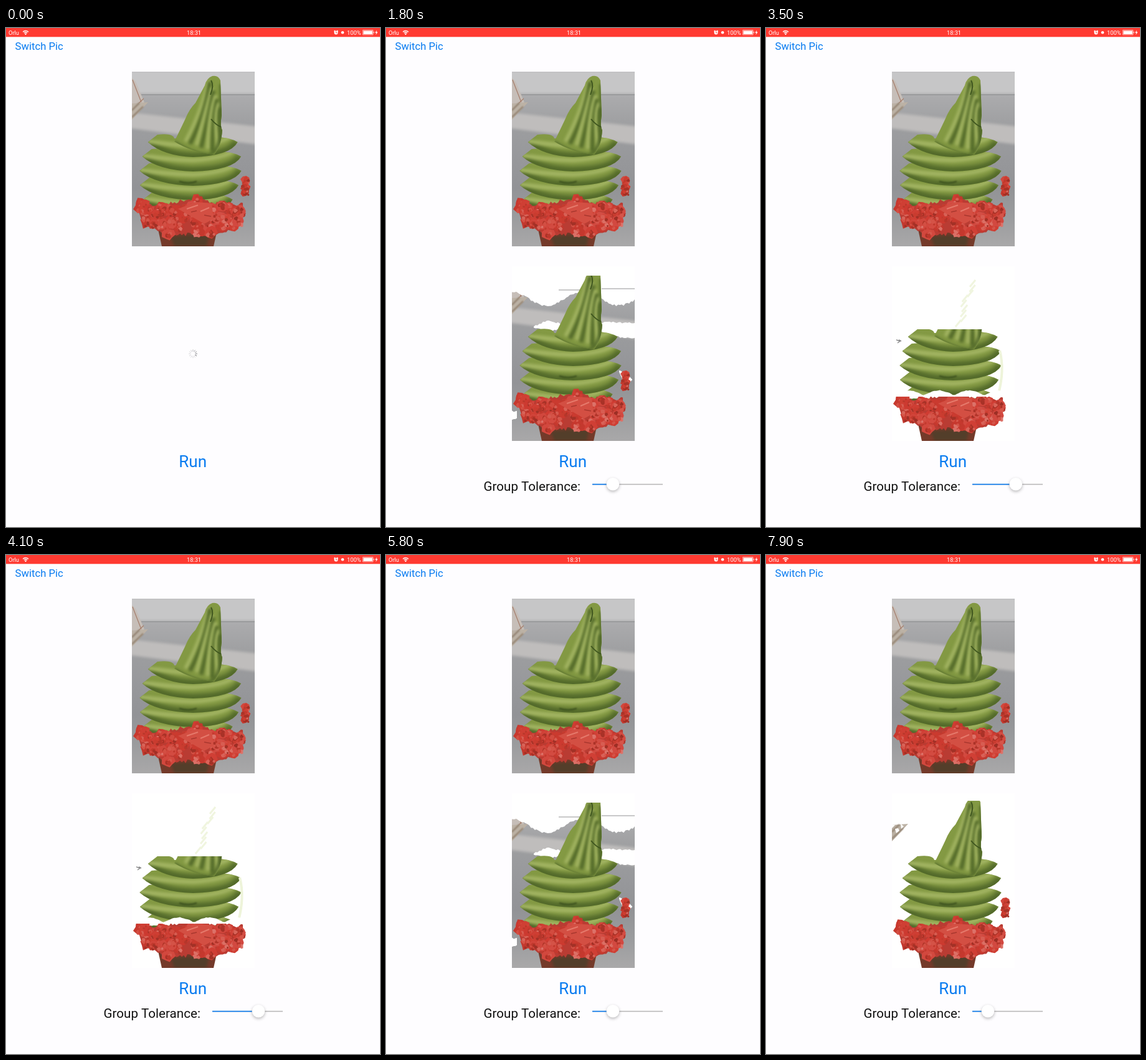
An HTML page with a canvas that plays this animation: 600x800 px, repeating every 8 s.

```html
<!DOCTYPE html>
<html lang="en">
<head>
<meta charset="utf-8">
<style>
html, body { margin: 0; width: 100%; height: 100%; overflow: hidden; background: #fefdff; }
canvas { display: block; }
</style>
</head>
<body>
<canvas id="stage" width="600" height="800"></canvas>
<script>
const g = document.getElementById('stage').getContext('2d');
const LOOP = 8000, RESULT_AT = 1500, BLUE = '#087bf0', TAU = Math.PI * 2;
const PX = 202, PY = 70, PW = 197, PH = 280, DROP = 312;
const LIGHT = '#a2b462', BASE = '#839943', DARK = '#52692a';

let seed = 7;
const rnd = () => (seed = seed * 16807 % 2147483647) / 2147483647;
const spread = r => (rnd() * 2 - 1) * r;

// Pictures are drawn in stage coordinates of the upper photo
function layer(paint) {
  const c = document.createElement('canvas');
  c.width = PW; c.height = PH;
  const x = c.getContext('2d');
  x.translate(-PX, -PY);
  paint(x);
  return c;
}
const put = (x, img, y = PY) => x.drawImage(img, PX, y);

function fill(x, color, d) {
  x.fillStyle = color;
  x.fill(new Path2D(d));
}
function line(x, color, width, d) {
  x.strokeStyle = color;
  x.lineWidth = width;
  x.stroke(new Path2D(d));
}
function disc(x, cx, cy, r) {
  x.beginPath();
  x.arc(cx, cy, r, 0, TAU);
  x.fill();
}
// The part of a picture under a level line
function below(x, y, img) {
  x.save();
  x.beginPath();
  x.rect(PX, y, PW, PH);
  x.clip();
  put(x, img);
  x.restore();
}
// A band with rough edges; top and bottom are functions of 0..1
function band(x, color, x0, x1, top, bottom, rough = 1.5) {
  const n = Math.ceil((x1 - x0) / 3);
  x.fillStyle = color;
  x.beginPath();
  for (let k = 0; k <= n; k++) x.lineTo(x0 + (x1 - x0) * k / n, top(k / n) + spread(rough));
  for (let k = n; k >= 0; k--) x.lineTo(x0 + (x1 - x0) * k / n, bottom(k / n) + spread(rough));
  x.fill();
}
const bulge = u => Math.sin(Math.PI * u);

const corner = layer(x => {
  fill(x, '#bcb2a5', 'M202 121 L228 119 L202 147Z');
  x.filter = 'blur(.8px)';
  line(x, '#8a7967', 2, 'M202 132 L214 120 M202 143 L220 126');
});

const street = layer(x => {
  const tone = x.createLinearGradient(0, PY, 0, PY + PH);
  ['#bcbcbe', '#a9a9ab', '#9c9d9f', '#97989b', '#929396', '#9b9c9e', '#a9a8a9']
    .forEach((c, i, all) => tone.addColorStop(i / (all.length - 1), c));
  x.fillStyle = tone;
  x.fillRect(PX, PY, PW, PH);
  x.filter = 'blur(2px)';
  fill(x, '#c6c6c7', 'M195 70 H405 V105 H195Z');
  fill(x, '#bfbdbc', 'M195 135 L405 158 V187 L195 160Z');
  x.filter = 'blur(.7px)';
  line(x, '#929395', 1.5, 'M202 107 H400');
  fill(x, '#c6beb8', 'M202 80 L208 86 L222 119 L202 134Z');
  line(x, '#a7816f', 1.3, 'M203 83 L217 119 M203 130 L221 113');
  x.filter = 'none';
  put(x, corner);
});

// One turn of the swirl: pointed at the left, shaded along its lower edge
function coil(x, i) {
  const left = 214 + 2.4 * (2.4 - i) ** 2, right = 378 - 2.5 * (i - 1.6) ** 2, y = 171 + 23 * i;
  const under = `M${left} ${y + 12} Q${left + 24} ${y + 34} 300 ${y + 36} Q${right - 12} ${y + 34} ${right} ${y + 12}`;
  const crest = `M${left} ${y + 10} Q${left + 40} ${y + 17} 300 ${y + 18} Q${right - 25} ${y + 15} ${right - 8} ${y}`;
  const shape = new Path2D(`${under} Q${right - 14} ${y + 3} 330 ${y + 4} L270 ${y + 6} Q${left + 40} ${y - 3} ${left + 15} ${y} Z`);
  x.save();
  x.fillStyle = BASE;
  x.fill(shape);
  x.clip(shape);
  x.filter = 'blur(3px)';
  line(x, DARK, 15, under);
  x.filter = 'blur(2px)';
  line(x, LIGHT, 7, crest);
  x.restore();
}

function peak(x) {
  const shape = new Path2D('M270 182 Q282 158 288 145 Q294 130 304 120 L319 92 Q322 80 331 77 Q340 75 344 84 L346 140 Q343 158 347 164 Q345 190 334 203 Q300 200 270 182Z');
  x.save();
  x.fillStyle = BASE;
  x.fill(shape);
  x.clip(shape);
  x.filter = 'blur(2px)';
  for (let k = 0; k < 4; k++) {
    const foot = 280 + 18 * k, top = 322 + 6 * k;
    line(x, LIGHT, 6, `M${top + 3} ${84 + 12 * k} Q${top - 8} 135 ${foot + 8} ${182 + 6 * k}`);
    line(x, DARK, 6, `M${top + 5} ${86 + 14 * k} Q${top - 2} 140 ${foot + 15} ${186 + 6 * k}`);
  }
  line(x, DARK, 5, 'M345 90 V168 Q342 195 326 204 Q298 201 270 183');
  x.filter = 'blur(.7px)';
  line(x, '#3f561f', 2, 'M329 84 Q334 92 328 107 M329 146 Q337 156 346 159');
  x.restore();
}

const cream = layer(x => {
  for (let i = 4; i >= 0; i--) coil(x, i);
  x.filter = 'blur(1px)';
  line(x, '#3a4f1d', 2, 'M278 246 Q292 251 306 246');
  x.filter = 'none';
  peak(x);
});

function crumb(x, cx, cy, r, color) {
  x.fillStyle = color;
  x.beginPath();
  for (let k = 0; k < 9; k++) {
    const a = k * TAU / 9, d = r * (.75 + rnd() * .5);
    x.lineTo(cx + d * Math.cos(a), cy + d * Math.sin(a));
  }
  x.fill();
}
function cluster(x, cx, cy, r) {
  crumb(x, cx, cy, r, `hsl(4 62% ${51 + spread(4)}%)`);
  for (let k = 0; k < 7; k++) {
    crumb(x, cx + spread(r * .7), cy + spread(r * .7), 1.5 + rnd() * 2.5, `hsl(5 62% ${51 + spread(13)}%)`);
  }
}

const berries = layer(x => {
  fill(x, '#743a2a', 'M242 314 L250 350 H333 L341 314Z');
  x.filter = 'blur(2px)';
  fill(x, '#533e2a', 'M264 334 L270 350 H322 L326 330Z');
  x.filter = 'blur(.6px)';
  const top = u => 279 + 5 * Math.sin(u * 9), depth = u => 20 + 36 * bulge(u) ** .7;
  band(x, '#b93c33', 214, 380, top, u => top(u) + depth(u), 3);
  for (let k = 0; k < 66; k++) {
    const u = (k * .618) % 1;
    cluster(x, 215 + 163 * u, top(u) + depth(u) * rnd(), 7 + rnd() * 3);
  }
  for (const y of [245, 254, 263]) cluster(x, 384, y, 7);
  fill(x, '#d34f43', 'M276 290 L304 279 L330 281 L333 306 L318 314Z');
  line(x, '#e5796b', 2, 'M290 290 L308 284 M312 294 L326 288');
  line(x, '#a8372e', 1.5, 'M297 295 L306 293 M318 300 L329 302');
});

const photo = layer(x => [street, cream, berries].forEach(img => put(x, img)));

const partial = layer(x => {
  put(x, street);
  const hole = (...shape) => band(x, '#fff', ...shape);
  hole(200, 402, () => 66, u => 122 - 11 * Math.cos(11 * u));
  hole(237, 288, u => 167 - 9 * bulge(u), u => 167 + 7 * bulge(u));
  hole(344, 402, () => 160, u => 180 + 6 * u);
  hole(374, 395, u => 236 + 14 * u, u => 238 + 14 * u + 14 * bulge(u));
  hole(200, 210, () => 302, () => 315);
  line(x, '#b7b7b8', 1.5, 'M277 108 H314 M346 106 H399');
  below(x, 85, cream);
  put(x, berries);
});

const heavy = layer(x => {
  x.fillStyle = '#fff';
  x.fillRect(PX, PY, PW, PH);
  below(x, 171, cream);
  x.filter = 'blur(.6px)';
  line(x, '#eef4da', 4, 'M375 205 Q383 236 373 274');
  for (let k = 0; k < 9; k++) {
    const y = 92 + 8 * k, left = 326 - 2.3 * k + spread(4);
    line(x, '#f0f5df', 3, `M${left + 8} ${y} l-9 11`);
  }
  x.filter = 'none';
  band(x, '#fff', 204, 390, u => 277 - 8 * Math.abs(Math.sin(u * 12)), () => 282, .5);
  below(x, 279, berries);
  line(x, '#8b8b8c', 1.5, 'M209 188 L215 190 L211 193 M213 188 L217 190');
});

const clean = layer(x => {
  x.fillStyle = '#fff';
  x.fillRect(PX, PY, PW, PH);
  put(x, corner);
  below(x, 82, cream);
  put(x, berries);
});

const holed = layer(x => {
  put(x, clean);
  fill(x, '#fff', 'M207 127 L212 126 L214 130 L209 134Z M216 119 L221 123 L217 127Z M202 121 H207 L202 126Z');
});

// Each result with the time it appears
const results = [[RESULT_AT, partial], [3500, heavy], [5200, partial], [6900, clean], [7500, holed]];
// Knob drags: start, end, distance
const drags = [[2700, 3700, 41], [4400, 5400, -41], [6200, 6900, -6], [7300, 7800, -2]];

function ease(t, a, b) {
  const p = Math.min(1, Math.max(0, (t - a) / (b - a)));
  return p * p * (3 - 2 * p);
}
const knobAt = t => drags.reduce((x, [a, b, way]) => x + way * ease(t, a, b), 364);

function text(str, x, y, size, color, align = 'left') {
  g.font = `${size}px Roboto, sans-serif`;
  g.textAlign = align;
  g.fillStyle = color;
  g.fillText(str, x, y);
}

function statusBar() {
  g.fillStyle = '#ff3a31';
  g.fillRect(0, 0, 600, 14.3);
  text('Orlu', 4, 10.5, 9.3, '#fff');
  text('18:31', 301.5, 10.5, 9.3, '#fff', 'center');
  text('100%', 547, 10.5, 9.3, '#fff');
  g.strokeStyle = '#fff';
  g.lineWidth = 1.4;
  for (const r of [3.4, 6]) {
    g.beginPath();
    g.arc(31.5, 10.5, r, -Math.PI * .76, -Math.PI * .24);
    g.stroke();
  }
  disc(g, 31.5, 9.8, 1.2);
  disc(g, 529.5, 7.5, 3);
  disc(g, 540, 7.3, 2.3);
  line(g, '#fff', 1.2, 'M526.3 5.5 L528 4 M532.7 5.5 L531 4');
  line(g, '#ff3a31', .9, 'M529.5 5.5 V7.8 H531.3');
  line(g, '#ffd0cd', .8, 'M572.4 3.4 H588.8 V11 H572.4Z');
  fill(g, '#fff', 'M573.4 4.4 h14.4 v5.6 h-14.4Z M589.5 5.8 h1 v2.8 h-1Z M595 3.5 L592 7.8 H594 L593.3 11 L596.5 6.6 H594.4Z');
}

function spinner(t) {
  const head = 1 + Math.floor(t * 12 / 1000);
  g.lineWidth = 1;
  for (let k = 0; k < 12; k++) {
    const age = (head - k + 12) % 12, a = k * TAU / 12;
    g.strokeStyle = `rgba(110,110,115,${Math.max(.28, 1 - age * .13)})`;
    g.beginPath();
    for (const r of [3.6, 6.9]) g.lineTo(300 + r * Math.cos(a), 522.3 + r * Math.sin(a));
    g.stroke();
  }
}

function slider(x) {
  g.fillStyle = '#b8b7b8';
  g.fillRect(331, 730.8, 113, 1.6);
  g.fillStyle = BLUE;
  g.fillRect(331, 730.8, x - 331, 1.6);
  g.save();
  g.shadowColor = 'rgba(0,0,0,.28)';
  g.shadowBlur = 5;
  g.shadowOffsetY = 2;
  g.fillStyle = '#fff';
  disc(g, x, 731.3, 10.3);
  g.restore();
}

function draw(t) {
  g.fillStyle = '#fefdff';
  g.fillRect(0, 0, 600, 800);
  statusBar();
  text('Switch Pic', 14.5, 35.3, 16.7, BLUE);
  put(g, photo);
  text('Run', 299.7, 703.5, 26, BLUE, 'center');
  if (t < RESULT_AT) return spinner(t);
  put(g, results.filter(r => r[0] <= t).pop()[1], PY + DROP);
  text('Group Tolerance:', 156.5, 741.5, 20.6, '#111');
  slider(knobAt(t));
}

const start = performance.now();
function tick() {
  draw((performance.now() - start) % LOOP);
  requestAnimationFrame(tick);
}
tick();
</script>
</body>
</html>
```
